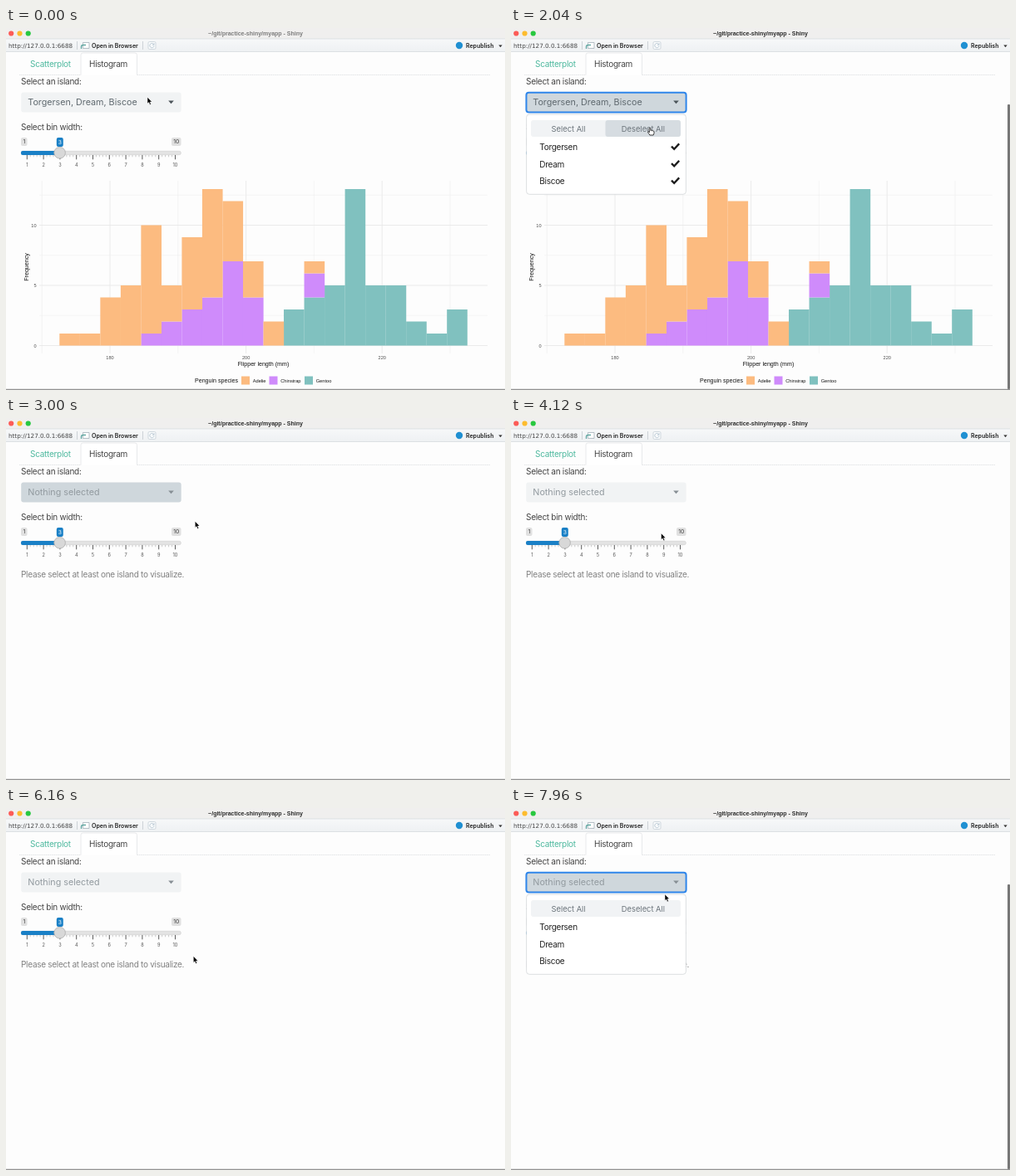
These frames come from a looping animation (600x436 px, 8 s). An HTML page:

```html
<!DOCTYPE html>
<html lang="en">
<head>
<meta charset="utf-8">
<title>Penguin histogram</title>
<style>
  html, body { margin: 0; height: 100%; overflow: hidden; background: #fdfdfd; }
  svg { display: block; width: 100vw; height: 100vh; }
  text { font: 10px Inter, sans-serif; fill: #444; white-space: pre; }
  .ui text { letter-spacing: -.028em; }
  .bar text { font-size: 7px; font-weight: 600; fill: #222; }
  .ticks text { font-size: 5.6px; text-anchor: middle; fill: #555; letter-spacing: 0; }
  .badge { font-size: 6.8px !important; text-anchor: middle; letter-spacing: 0 !important; }
  .plot text { font: 7.1px "Liberation Sans", Arial, sans-serif; fill: #111; }
  .plot .small { font-size: 5.6px; fill: #4d4d4d; }
  .plot .key { font-size: 5.7px; }
  .wide text { font-size: 9.35px; fill: #6b747b; }
</style>
</head>
<body>
<svg viewBox="0 0 600 436">
  <defs>
    <linearGradient id="tool" x2="0" y2="1">
      <stop stop-color="#f7f8f9"/><stop offset="1" stop-color="#eef1f3"/>
    </linearGradient>
  </defs>
  <rect width="600" height="436" fill="#fdfdfd"/>

  <g class="bar">
    <rect width="600" height="13" fill="#f0efee"/>
    <rect y="13" width="600" height="15.5" fill="url(#tool)"/>
    <path d="M0 13H600M0 28.5H600" stroke="#d6dbdf" stroke-width=".8"/>
    <circle cx="6.2" cy="6.5" r="3.1" fill="#fc5b57"/>
    <circle cx="16.5" cy="6.5" r="3.1" fill="#fdbc2e"/>
    <circle cx="26.7" cy="6.5" r="3.1" fill="#28c840"/>
    <text id="title" x="300" y="9" text-anchor="middle" style="font:bold 7px 'Liberation Sans',Arial,sans-serif">~/git/practice-shiny/myapp - Shiny</text>
    <text x="3" y="23.7" style="font:7.2px 'DejaVu Sans',sans-serif;fill:#444">http://127.0.0.1:6688</text>
    <path d="M85.5 16V26M164.5 16V26" stroke="#c3c9ce" stroke-width=".8"/>
    <path d="M92.5 17.5H100V24.5H92.5Z" fill="#fff" stroke="#9aa7b0" stroke-width=".7"/>
    <path d="M90.5 25V22.5Q90.5 20.5 93 20.5H96" fill="none" stroke="#5fa6a0" stroke-width="1.3"/>
    <text x="103" y="23.6">Open in Browser</text>
    <rect x="171" y="16.5" width="9" height="9" rx="1.5" fill="#f8fafb" stroke="#c2ccd4" stroke-width=".7"/>
    <path d="M177.5 19.5A2.6 2.6 0 1 0 178 21.6M178 18.3V20.2H176" fill="none" stroke="#b3c3d0" stroke-width=".9"/>
    <circle cx="545" cy="21" r="4.2" fill="#2090d2"/>
    <text x="553" y="23.6">Republish</text>
    <path d="M592.3 20.5H596.7L594.5 23.3Z" fill="#333"/>
  </g>

  <g class="ui">
    <path d="M16 56.5H90M157.5 56.5H582" stroke="#dcdfe1" stroke-width=".8" stroke-dasharray="1.5 .8"/>
    <path d="M90 56.5V32.5Q90 30 92.5 30H155Q157.5 30 157.5 32.5V56.5" fill="#fff" stroke="#e2e4e6" stroke-width=".8"/>
    <text x="29" y="46.6" style="fill:#4fb99f">Scatterplot</text>
    <text x="100" y="46.6">Histogram</text>
    <text x="18" y="68.3">Select an island:</text>
    <text x="18" y="123">Select bin width:</text>

    <g id="slider">
      <rect x="18" y="132" width="7.5" height="10" rx="2" fill="#e0e0e0"/>
      <rect x="199" y="132" width="11.5" height="10" rx="2" fill="#e0e0e0"/>
      <rect x="60.8" y="132" width="8" height="11" rx="2" fill="#1a80c6"/>
      <text class="badge" x="21.8" y="139.4">1</text>
      <text class="badge" x="204.8" y="139.4">10</text>
      <text class="badge" x="64.8" y="140" style="fill:#fff">3</text>
      <rect x="18.3" y="148.3" width="192" height="4.4" rx="2" fill="#e3e3e3" stroke="#cfcfcf" stroke-width=".6"/>
      <rect x="18" y="148" width="47" height="5" rx="2" fill="#1a80c6"/>
      <g id="scale" class="ticks"></g>
      <circle cx="64.6" cy="150.3" r="6.8" fill="#d8d8d8" stroke="#ababab" stroke-width=".8"/>
    </g>
  </g>

  <g id="plot" class="plot"></g>
  <g id="message" class="ui">
    <rect id="selection" x="18" y="182.5" height="12.5" fill="#bfe3b8"/>
    <text x="18" y="192.4" style="fill:#808080">Please select at least one island to visualize.</text>
  </g>
  <path d="M0 435.3H600" stroke="#777" stroke-width="1"/>

  <rect id="button" x="18.2" y="77.5" width="192.5" height="24" rx="3"/>
  <rect id="focus" x="18.4" y="77.8" width="192.2" height="23.6" rx="3" fill="none" stroke="#2f86ea" stroke-width="2"/>
  <text id="choice" x="26.3" y="93.2" style="font-size:10.75px"></text>
  <path id="caret" d="M195.2 87.5H201.8L198.5 91.2Z"/>

  <g id="menu">
    <rect x="18.6" y="104" width="191.8" height="96.3" rx="3.5" fill="#fff" stroke="#d4d7da" stroke-width=".8"/>
    <rect x="24" y="111" width="180" height="20" rx="3" fill="#f1f3f5"/>
    <rect id="hover" x="113.5" y="111" width="90.5" height="20" rx="3" fill="#d6dce1"/>
    <g class="wide">
      <text x="48.5" y="124.5">Select All</text>
      <text x="132.8" y="124.5">Deselect All</text>
    </g>
    <g id="islands" class="ui"></g>
    <g id="checks" fill="none" stroke="#1c1c1c" stroke-width="2.3"></g>
    <rect x="597" y="92" width="3" height="343" rx="1" fill="#777"/>
  </g>

  <g id="cursor" stroke-linejoin="round" stroke-linecap="round">
    <path id="arrow" d="M0 0V7.6L1.7 6.1L3 8.9L4.4 8.3L3.1 5.6H5.4Z" fill="#000" stroke="#fff" stroke-width=".5"/>
    <path id="hand" d="M-.8 .8Q0 -.3 .8 .8V3.4Q1.8 2.7 2.3 3.7Q3.3 3 3.7 4Q5 3.7 5 5V6.8Q4.6 8 4.2 9H-.1Q-1 7.5 -2.4 5.7Q-2.6 4.4 -1.3 4.9L-.8 5.4Z" fill="#fff" stroke="#111" stroke-width=".8"/>
    <path id="ibeam" d="M-1.6 -3.7Q0 -3.7 0 -2.7Q0 -3.7 1.6 -3.7M0 -2.7V2.7M-1.6 3.7Q0 3.7 0 2.7Q0 3.7 1.6 3.7M-.8 .8H.8" fill="none" stroke="#111" stroke-width=".9"/>
  </g>
</svg>
<script>
const LOOP = 8000, OPEN = 420, DESELECT = 2120, CLEARED = 2400, CLOSE = 2920, REOPEN = 7720;
const $ = id => document.getElementById(id);
const range = n => [...Array(n).keys()];
const ramp = (t, a, b) => Math.min(1, Math.max(0, (t - a) / (b - a)));
const show = (id, on) => $(id).style.display = on ? '' : 'none';
const mix = (a, b, k) => `rgb(${a.map((v, i) => v + (b[i] - v) * k)})`;
const line = (x1, y1, x2, y2, color, width) =>
  `<path d="M${x1} ${y1}L${x2} ${y2}" stroke="${color}" stroke-width="${width}"/>`;
const label = (x, y, s, attrs = '') => `<text x="${x}" y="${y}" ${attrs}>${s}</text>`;

function buildScale() {
  const step = 19.8;
  $('scale').innerHTML = range(10).map(i => {
    const x = 25.3 + i * step;
    const minor = i < 9 ? range(4).map(j => line(x + (j + 1) * step / 5, 153, x + (j + 1) * step / 5, 155.3, '#999', .5)).join('') : '';
    return line(x, 153, x, 158.3, '#333', .8) + minor + label(x, 167.2, i + 1);
  }).join('');
}

function buildPlot() {
  const species = [
    { name: 'Adelie', color: '#fcbb80', x: 283, first: 0, counts: [1, 1, 4, 5, 9, 3, 6, 9, 5, 3, 2, 0, 1] },
    { name: 'Chinstrap', color: '#cf8bfb', x: 316.5, first: 4, counts: [1, 2, 3, 4, 7, 4, 0, 0, 2] },
    { name: 'Gentoo', color: '#80c1bf', x: 359, first: 11, counts: [3, 4, 5, 13, 5, 5, 2, 1, 3] }
  ];
  const px = mm => 125 + (mm - 180) * 8.18;
  const py = n => 382.5 - n * 14.5;
  const binWidth = 24.52, base = Array(20).fill(0);
  let out = '';
  for (const mm of [170, 180, 190, 200, 210, 220, 230])
    out += line(px(mm), 184, px(mm), 392, '#e9e9e9', mm % 20 ? .45 : .9);
  for (const n of [0, 2.5, 5, 7.5, 10, 12.5])
    out += line(40, py(n), 579, py(n), '#e9e9e9', n % 5 ? .45 : .9);
  for (const { name, color, x, first, counts } of [...species].reverse()) {
    counts.forEach((n, i) => {
      const bin = first + i;
      base[bin] += n;
      if (n) out += `<rect x="${64.3 + bin * binWidth}" y="${py(base[bin])}" width="${binWidth + .1}" height="${n * 14.5}" fill="${color}"/>`;
    });
    out += `<rect x="${x}" y="419.5" width="10" height="10" fill="${color}"/>` + label(x + 13.7, 426.7, name, 'class="key"');
  }
  for (const mm of [180, 200, 220]) out += label(px(mm), 399, mm, 'class="small" text-anchor="middle"');
  for (const n of [0, 5, 10]) out += label(36.5, py(n) + 2, n, 'class="small" text-anchor="end"');
  out += label(309.5, 407, 'Flipper length (mm)', 'text-anchor="middle"');
  out += label(0, 0, 'Frequency', 'text-anchor="middle" transform="translate(27 288)rotate(-90)"');
  $('plot').innerHTML = out + label(227, 427, 'Penguin species');
}

function buildMenu() {
  const names = ['Torgersen', 'Dream', 'Biscoe'];
  $('islands').innerHTML = names.map((s, i) => label(34.3, 147.4 + i * 20.5, s, 'style="fill:#222"')).join('');
  $('checks').innerHTML = names.map((s, i) => `<path d="M193 ${142.6 + i * 20.5}l3.2 3.2l6 -6.4"/>`).join('');
}

// time, x, y of the pointer's hot spot
const path = [
  [0, 170, 83.5], [60, 170, 83.5], [400, 173, 86], [880, 173, 86], [1560, 167, 120],
  [2200, 167, 120], [2720, 227.3, 124.5], [4040, 227.3, 124.5], [4720, 18.5, 189], [4920, 18.5, 189],
  [5080, 133.5, 188.5], [5560, 230, 193.3], [6040, 230, 193.3], [6800, 214, 143],
  [7200, 205, 98.7], [7640, 186, 90], [7700, 186, 90], [7920, 185, 104], [LOOP, 185, 104]
];

function pointer(t) {
  const i = Math.max(1, path.findIndex(p => p[0] > t));
  const [a, b] = [path[i - 1], path[i]];
  const u = ramp(t, a[0], b[0]), k = u * (2 - u);
  return [a[1] + (b[1] - a[1]) * k, a[2] + (b[2] - a[2]) * k];
}

function draw(t) {
  const [x, y] = pointer(t);
  const open = t >= OPEN && t < CLOSE || t >= REOPEN;
  const empty = t >= DESELECT;
  const inside = (x1, y1, x2, y2) => x >= x1 && x < x2 && y >= y1 && y < y2;
  const overDeselect = open && inside(113.5, 111, 204, 131);
  const overButton = t > 200 && inside(18, 77, 211, 101.5);
  const overText = t > CLEARED && inside(17, 182, 215, 197) || t > 4720 && t < 5720;
  const shape = overText ? 'ibeam' : overButton || overDeselect ? 'hand' : 'arrow';
  for (const s of ['arrow', 'hand', 'ibeam']) show(s, s === shape);
  $('cursor').setAttribute('transform', `translate(${x} ${y})`);

  $('title').style.fill = t < 400 ? '#7c7c7c' : '#2a2a2a';
  const active = t < 2000 ? ramp(t, 280, 420) : t < 5000 ? 1 - ramp(t, 3000, 3360) : ramp(t, 7200, 7360);
  $('button').style.fill = mix([241, 243, 244], [207, 215, 220], active);
  $('choice').textContent = empty ? 'Nothing selected' : 'Torgersen, Dream, Biscoe';
  $('choice').style.fill = empty ? '#929a9f' : '#5f696f';
  $('caret').style.fill = empty ? '#878f94' : '#4b5459';

  show('focus', open);
  show('menu', open);
  show('hover', overDeselect);
  show('checks', !empty);
  show('plot', t < CLEARED);
  $('plot').style.opacity = 1 - .7 * ramp(t, DESELECT, CLEARED);
  show('message', t >= CLEARED);
  const selected = t > 4920 && t < 6080 ? Math.min(214.5, pointer(Math.max(4920, t - 70))[0]) - 18 : 0;
  $('selection').setAttribute('width', Math.max(0, selected));
}

buildScale();
buildPlot();
buildMenu();
function frame() {
  draw(performance.now() % LOOP);
  requestAnimationFrame(frame);
}
frame();
</script>
</body>
</html>
```
